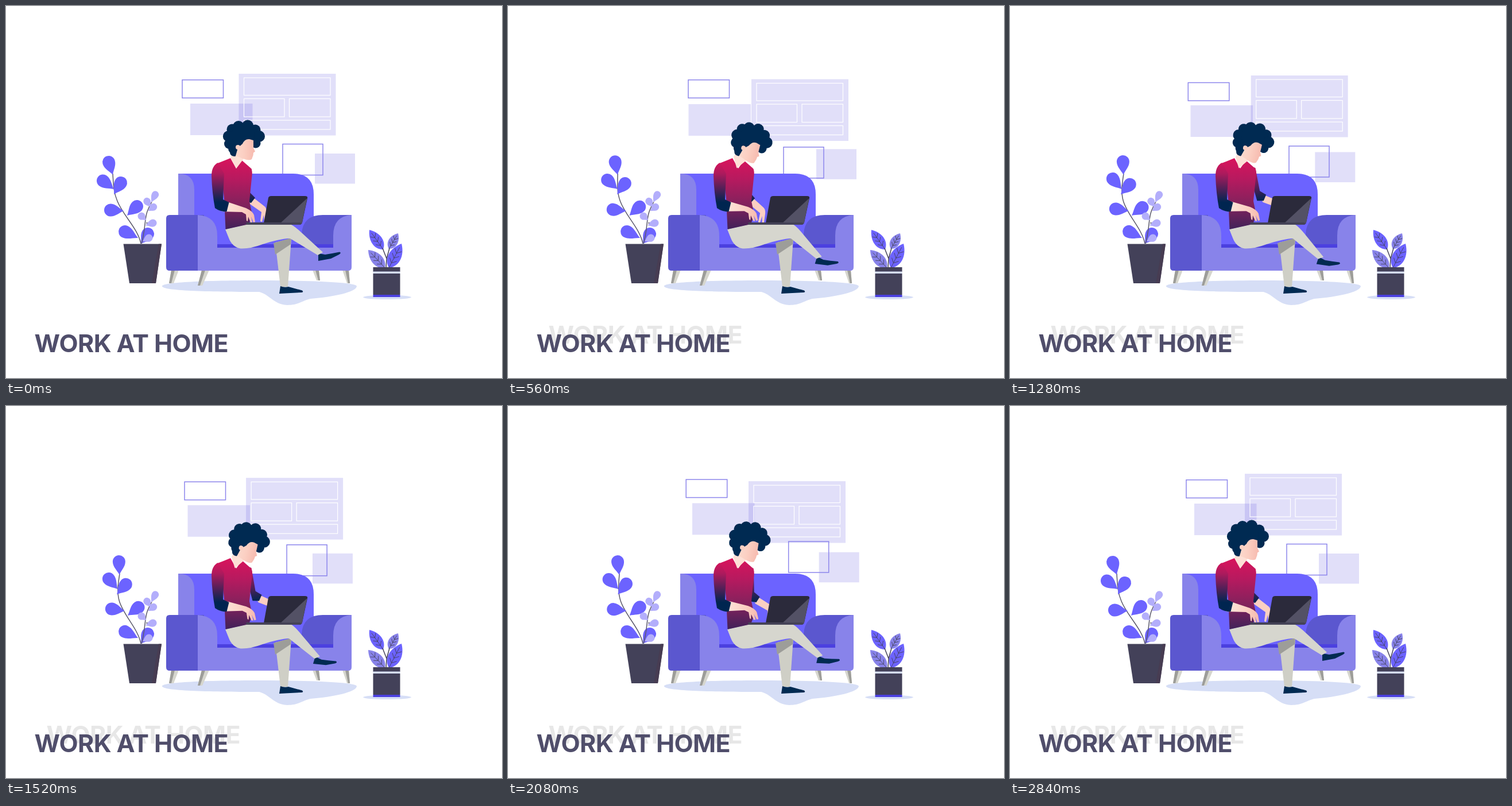
Animation, 864 px wide and 648 px high, one loop 2880 ms. Source, as an HTML page:

```html
<!DOCTYPE html>
<html lang="en">
<head>
<meta charset="utf-8">
<title>Work at home</title>
<style>
  html, body { margin: 0; width: 100%; height: 100%; overflow: hidden; background: #fff; }
  svg { display: block; width: 100%; height: 100%; }
  text { font: 700 43px Inter, "Open Sans", sans-serif; letter-spacing: -.6px; }
  .fill { fill: rgba(92, 79, 222, .18); }
  .outline { fill: none; stroke: #8d86ec; stroke-width: 1.5; }
  .inner { fill: none; stroke: #fff; stroke-width: 1.2; }
  .violet { fill: #6c63ff; }
  .lilac { fill: #8883ea; }
  .indigo { fill: #5b57cf; }
  .pale { fill: #b3aefb; }
  .mist { fill: #d6def6; }
  .slate { fill: #434159; }
  .navy { fill: #002a52; }
  .cloth { fill: #d6d6ce; }
  .shade { fill: #9d9d99; }
  .stem { fill: none; stroke: #5b596c; stroke-width: 1.5; }
  .vein { fill: none; stroke: #434159; stroke-width: .8; }
  #echo { fill: #e7e7e7; animation: echo 2880ms step-end infinite; }
  @keyframes echo { 0% { opacity: 0; } 1.3% { opacity: 1; } }
</style>
</head>
<body>
<svg viewBox="0 0 864 648">
  <defs>
    <linearGradient id="shirt" gradientUnits="userSpaceOnUse" x1="0" y1="265" x2="0" y2="392">
      <stop offset="0" stop-color="#d8145c"/><stop offset=".3" stop-color="#b51a5f"/>
      <stop offset=".65" stop-color="#80225c"/><stop offset="1" stop-color="#3c2158"/>
    </linearGradient>
    <linearGradient id="sleeve" gradientUnits="userSpaceOnUse" x1="0" y1="270" x2="0" y2="342">
      <stop offset="0" stop-color="#d8145c"/><stop offset=".3" stop-color="#ad1a5d"/>
      <stop offset=".75" stop-color="#3d2156"/><stop offset="1" stop-color="#002550"/>
    </linearGradient>
    <linearGradient id="skin" gradientUnits="userSpaceOnUse" x1="384" y1="0" x2="434" y2="0">
      <stop offset="0" stop-color="#fde3d8"/><stop offset=".6" stop-color="#fbcfc2"/>
      <stop offset="1" stop-color="#f6b9ae"/>
    </linearGradient>
  </defs>

  <!-- wall panels -->
  <rect id="leftOutline" class="outline" width="71.5" height="31.5"/>
  <rect id="leftFill" class="fill" width="108.5" height="55"/>
  <g id="board">
    <rect class="fill" width="169" height="107.5"/>
    <rect class="inner" x="9" y="7" width="150.5" height="30.5"/>
    <rect class="inner" x="9" y="43.5" width="70.5" height="31.5"/>
    <rect class="inner" x="88" y="43.5" width="71.5" height="31.5"/>
    <rect class="inner" x="9" y="81" width="150.5" height="16"/>
  </g>
  <rect id="rightFill" class="fill" width="70" height="52.5"/>
  <rect id="rightOutline" class="outline" width="70" height="54"/>

  <!-- floor and sofa -->
  <path class="mist" d="M272 488C272 481 350 478 440 478S611 481 611 488C611 498 570 507 530 510 514 514 510 521 490 521 466 520 460 503 441 498 350 498 272 496 272 488Z"/>
  <path class="cloth" d="M288 460H301L292 483H284ZM341 460H354L342 487H334ZM534 460H545L547 478H541ZM586 460H597L599 483H594Z"/>
  <path class="shade" d="M288 460H294L288 483H284ZM341 460H347L338 487H334ZM539 460H545L547 478H544ZM591 460H597L599 483H596Z"/>
  <path class="violet" d="M300 292H500Q536 292 536 328V420H300Z"/>
  <path class="lilac" d="M300 292Q328 292 328 320V400H300Z"/>
  <path class="indigo" d="M285 364H345V461H285Q279 461 279 455V370Q279 364 285 364ZM515 416V397Q517 364 552 364H602V416Z"/>
  <path fill="#4b40e0" d="M360 415H575V423H360Z"/>
  <path class="lilac" d="M334 364Q368 366 368 400V421H570V400Q570 366 602 364V455Q602 461 596 461H334Z"/>

  <!-- plants -->
  <g id="branch"><path class="stem"/></g>
  <g id="sprig"><path class="stem" d="M236 414C243 390 241 372 246 358Q249 350 254 341M244 378L254 378"/></g>
  <path class="slate" d="M204.500 414.500H271L261 483H215Z"/>
  <path fill="#473c52" d="M266 414.500H271L261 483H254Z"/>
  <ellipse class="mist" cx="664" cy="507.300" rx="42" ry="3.700"/>
  <g id="foliage"></g>
  <path fill="none" stroke="#434159" stroke-width="1.500" d="M656 422L663 440 662 456M668 422L663 440"/>
  <path class="slate" d="M639.500 455H686.500V463H639.500ZM639.500 466H686.500V503H639.500Z"/>
  <path class="mist" d="M639.500 462.500H686.500V466H639.500Z"/>
  <path fill="#4b40e0" d="M639.500 503H686.500V507H639.500Z"/>

  <!-- person -->
  <g id="farArm">
    <path fill="#fbcfc2" d="M424 339L431 334 449 348Q454 351 454 359L453 376 450 377 449 364 446 376 443 375 445 359 425 345Z"/>
    <path fill="url(#sleeve)" d="M415 275L428 284 425 325 434 334 427 343 416 340Z"/>
  </g>
  <path fill="#cfcfc6" d="M469 412L497 405 491 489H478Z"/>
  <path class="shade" d="M466 413L497 404 496 415 469 433Z"/>
  <path class="navy" d="M478 488Q485 491 492 489L516 495.500Q519 499 515 499L476 501Z"/>
  <g id="shin">
    <g id="shoe"><path class="navy" d="M544 431L556 433 568 431 581 428.500Q585 430 580 433L566 440 544 444Z"/></g>
    <path class="cloth" d="M480 379L494 380Q500 381 515 395L552 429 543 434 495 405 482 404Z"/>
  </g>
  <path class="cloth" d="M382 389L425 379H490Q500 381 503 390L497 404Q470 407 447 415 426 423 409 422.500 394 420 388 404Z"/>
  <path fill="url(#shirt)" d="M391 265L366 275 376 300 380 335 382.500 389 423 380 429 364 424 340 428 300Q430 288 427 283L411 269 401 283Z"/>
  <g id="head">
    <path fill="#fde0d6" d="M394 256L391 265 401 283 411 270 417 262Z"/>
    <g id="hair" class="navy"><path d="M386 240L405 215 437 220 440 246 420 246 399 262Q389 262 390 252Z"/></g>
    <path fill="url(#skin)" d="M412 240Q416 231 424 232L431 234V247L434 253.500 431 255.500 430.500 260 428 267Q423 270 413 266L400 261 404 247Z"/>
    <circle cx="404" cy="246" r="4" fill="#fbcfc2"/>
  </g>
  <g id="nearArm"><path fill="url(#skin)" d="M376 340L388 342 418 352Q429 357 432 364L434 376 431 377 427 367 429 377 426 377 422 367 421 375 419 374 418 363 411 359 376 358Z"/></g>
  <path fill="url(#sleeve)" d="M369 273Q358 279 358 296 359 326 364 352 374 359 384.500 358L388.500 342 378 337 380 292Z"/>

  <!-- laptop -->
  <path fill="#2b2a3b" d="M457 334Q458 331 462 331H521Q526 331 525 335L516 377Q515 381 511 381L449 378Z"/>
  <path fill="#535165" d="M524.500 335L516 377Q515 380 511 380H476Z"/>
  <path fill="#454357" d="M418 377H514L512 381H419Z"/>

  <text id="echo" x="70.500" y="587.500">WORK AT HOME</text>
  <text x="49.500" y="602.500" fill="#504e6b">WORK AT HOME</text>
</svg>
<script>
  const LOOP = 2880, STEP = 40;
  const KEYS = [0, 560, 1280, 1720, 2080, 2520, 2840];
  const $ = id => document.getElementById(id);

  function add(parent, tag, attrs) {
    const node = document.createElementNS('http://www.w3.org/2000/svg', tag);
    for (const name in attrs) node.setAttribute(name, attrs[name]);
    return parent.appendChild(node);
  }

  // Smooth curve through values at the given times.
  function track(values, times = KEYS) {
    const last = times.length - 1;
    const slope = i => {
      const a = Math.max(i - 1, 0), b = Math.min(i + 1, last);
      return (values[b] - values[a]) / (times[b] - times[a]);
    };
    return t => {
      let i = 0;
      while (i < last - 1 && t >= times[i + 1]) i++;
      const span = times[i + 1] - times[i];
      const u = Math.min((t - times[i]) / span, 1), v = 1 - u;
      return v * v * (1 + 2 * u) * values[i] + u * u * (3 - 2 * u) * values[i + 1]
        + span * u * v * (v * slope(i) - u * slope(i + 1));
    };
  }

  const panels = [
    ['leftOutline', [307, 314, 310.3, 311.7, 310.2, 308.4, 307], [128.7, 128.7, 133.5, 130.2, 128, 131, 128.7]],
    ['leftFill', [321, 314.5, 314.5, 318.5, 321, 320.7, 321], [170, 171, 173, 172, 169.3, 166, 170]],
    ['board', [405.5, 424, 419.7, 417.3, 419, 416.2, 409], [118, 127.5, 121, 129.5, 131, 121.5, 118]],
    ['rightFill', [538, 537, 531.3, 537.3, 541.7, 540, 538], [257, 249.3, 254.5, 258, 254.7, 251.6, 257]],
    ['rightOutline', [482, 480, 486, 491, 488.7, 482, 482], [240.5, 245.8, 244, 239.5, 236, 236.5, 240.5]]
  ].map(([id, xs, ys]) => ({ node: $(id), x: track(xs), y: track(ys) }));

  const legSwing = track([0, 7.5, 10.3, 8.2, 6.6, 5.5, 3.2, 0], [0, 560, 900, ...KEYS.slice(2)]);
  const joints = [
    ['head', 402, 272, track([0, 14, 13.3, 11.7, 9, 4.5, 0])],
    ['farArm', 420, 285, track([0, 4.5, -15, -11, -5.5, -1.5, 0])],
    ['nearArm', 370, 345, track([0, -2.5, -2.5, -4, -4.5, -1, 0])],
    ['shin', 492, 392, legSwing],
    ['shoe', 549, 430, t => 1.28 * legSwing(t)]
  ].map(([id, x, y, angle]) => ({ node: $(id), x, y, angle }));

  // Round leaf whose tip sits at tx, ty and whose bulb is centred on cx, cy.
  function drop(parent, cls, [cx, cy, r, tx, ty]) {
    const d = Math.hypot(cx - tx, cy - ty);
    const angle = Math.atan2(cx - tx, ty - cy) * 180 / Math.PI;
    const node = add(parent, 'path', {
      class: cls,
      d: `M0 0C${-r * .35} ${-d * .35} ${-r} ${-d * .6} ${-r} ${-d}A${r} ${r} 0 0 1 ${r} ${-d}C${r} ${-d * .6} ${r * .35} ${-d * .35} 0 0Z`
    });
    const place = (dx, turn) => node.setAttribute('transform', `translate(${tx + dx} ${ty}) rotate(${angle + turn})`);
    place(0, 0);
    return { cy, ty, place };
  }

  const branchLeaves = [
    [179, 272, 11, 186, 294], [169, 304.5, 11, 188, 319], [200, 308, 11, 188, 328],
    [182, 355.5, 11, 205, 357], [228, 349, 11, 211, 365], [207, 393, 11, 230, 404],
    [247, 397, 11, 235, 414]
  ].map(leaf => drop($('branch'), 'violet', leaf));
  [
    [260, 328.500, 6.2, 253, 342], [245.5, 340, 6.2, 252, 350], [257, 350, 6.2, 248, 357],
    [236, 366, 6.5, 244, 373], [256, 378, 6.5, 243, 382], [249, 404, 6.5, 238, 410]
  ].forEach(leaf => drop($('sprig'), 'pale', leaf));

  // Pointed leaf with veins, from base bx, by to tip tx, ty.
  function pointed(cls, bx, by, tx, ty, width) {
    const length = Math.hypot(tx - bx, ty - by);
    const angle = Math.atan2(tx - bx, by - ty) * 180 / Math.PI;
    const g = add($('foliage'), 'g', { transform: `translate(${bx} ${by}) rotate(${angle})` });
    const side = w => `C${w} ${-length * .2} ${w} ${-length * .65} 0 ${-length}`;
    add(g, 'path', { class: cls, d: `M0 0${side(-width)}M0 0${side(width)}` });
    let veins = `M0 0V${-length * .85}`;
    for (const k of [.2, .4, .6]) {
      const y = -length * k, w = width * .45;
      veins += `M${-w} ${y - w}L0 ${y} ${w} ${y - w}`;
    }
    add(g, 'path', { class: 'vein', d: veins });
  }
  pointed('violet', 657, 424, 633, 390, 13);
  pointed('lilac', 667, 423, 683, 396, 11);
  pointed('lilac', 660, 456, 631, 425, 13);
  pointed('violet', 667, 456, 689, 414, 15);

  [
    [405, 210, 10], [421, 208.5, 10], [434, 216, 9.5], [441, 227, 10], [435, 239, 8.5],
    [394, 215, 9.5], [387.5, 227, 9.7], [389, 240, 9], [397, 248, 10], [413, 224, 20]
  ].forEach(([cx, cy, r]) => add($('hair'), 'circle', { cx, cy, r }));

  const sway = track([0, 7, 16.3, 15, 11, 4, 0]);
  const branchStem = $('branch').firstElementChild;

  function bendBranch(amount) {
    const reach = y => Math.max(0, (395 - y) / 120);
    const shift = y => amount * reach(y) ** 2;
    const turn = y => amount * 2 * reach(y) / 120 * 180 / Math.PI;
    for (const leaf of branchLeaves) leaf.place(shift(leaf.ty), turn(leaf.cy));
    const at = (x, y) => `${x + shift(y)} ${y} `;
    branchStem.setAttribute('d', 'M' + at(235, 414) + 'C' + at(230, 388) + at(204, 365) + at(194, 340)
      + 'C' + at(187, 324) + at(187, 308) + at(186, 292));
  }

  function draw(t) {
    for (const p of panels) p.node.setAttribute('transform', `translate(${p.x(t)} ${p.y(t)})`);
    for (const j of joints) j.node.setAttribute('transform', `rotate(${j.angle(t)} ${j.x} ${j.y})`);
    bendBranch(sway(t));
  }

  const start = performance.now();
  function tick() {
    const t = (performance.now() - start) % LOOP;
    draw(Math.floor(t / STEP) * STEP);
    requestAnimationFrame(tick);
  }
  tick();
</script>
</body>
</html>
```
